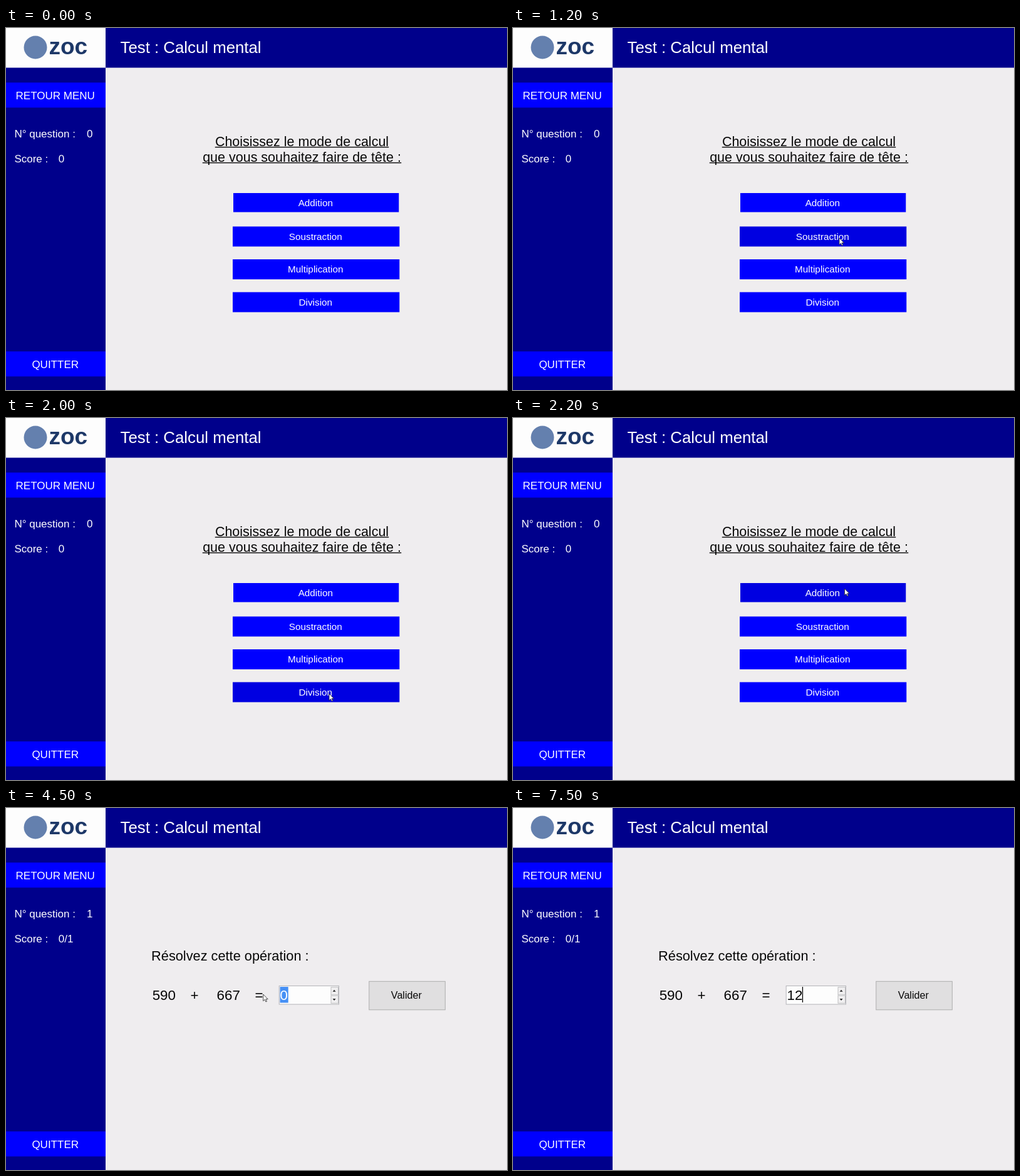
An HTML page that plays this animation: 800x579 px, repeating every 8000 ms.

```html
<!DOCTYPE html>
<html lang="fr">
<head>
<meta charset="utf-8">
<title>Calcul mental</title>
<style>
html, body { margin: 0; width: 100%; height: 100%; overflow: hidden; background: #efedef; }
svg { display: block; width: 100vw; height: 100vh; font-family: "Liberation Sans", Arial, sans-serif; }
text { white-space: pre; }
</style>
</head>
<body>
<svg id="stage" viewBox="0 0 800 579"></svg>
<script>
const NS = "http://www.w3.org/2000/svg";
const stage = document.getElementById("stage");
const NAVY = "#00008b", BLUE = "#0000ff", HOVER = "#0000e1", BLACK = "#080808", GREY = "#efedef";
const LOOP = 8000, STEP = 100;
const SIDE = 159, HEAD = 63.5;
const FIELD = 437.5, DIGIT = 12.4;

function add(parent, tag, attrs, content) {
  const node = document.createElementNS(NS, tag);
  for (const k in attrs) node.setAttribute(k, attrs[k]);
  if (content !== undefined) node.textContent = content;
  parent.appendChild(node);
  return node;
}
const group = () => add(stage, "g", {});
const rect = (p, x, y, width, height, fill, extra) =>
  add(p, "rect", { x, y, width, height, fill, ...extra });
const label = (p, str, x, y, size, fill, extra) =>
  add(p, "text", { x, y, "font-size": size, fill, ...extra }, str);
const mid = { "text-anchor": "middle" };
const show = (node, on) => node.setAttribute("visibility", on ? "visible" : "hidden");

// Header and sidebar
const frame = group();
rect(frame, 0, 0, 800, 579, GREY);
rect(frame, 0, 0, 800, HEAD, NAVY);
rect(frame, 0, 0, SIDE, 579, NAVY);
rect(frame, 0, 0, SIDE, HEAD, "#fdfdfd");
add(frame, "circle", { cx: 47, cy: 31, r: 18.5, fill: "#6480ae" });
label(frame, "zoc", 68.5, 41.5, 37, "#1d3868", { "font-weight": "bold" });
label(frame, "Test : Calcul mental", 182.5, 40.3, 25.8, "#fff");

function sideButton(name, y) {
  rect(frame, 0, y, SIDE, 40, BLUE);
  label(frame, name, 78.7, y + 26.7, 17, "#fff", mid);
}
sideButton("RETOUR MENU", 87.3);
sideButton("QUITTER", 517.3);

function stat(name, x, y) {
  label(frame, name, 13.4, y, 17, "#fff");
  return label(frame, "0", x, y, 17, "#fff");
}
const count = stat("N° question :", 129, 175);
const score = stat("Score :", 83.8, 215);

// Mode menu
const menu = group();
function heading(str, y, width) {
  label(menu, str, 472.5, y, 21.5, BLACK, mid);
  rect(menu, 472.5 - width / 2, y + 1.4, width, 1.4, BLACK);
}
heading("Choisissez le mode de calcul", 188.5, 277.5);
heading("que vous souhaitez faire de tête :", 213.5, 317.5);

const modes = ["Addition", "Soustraction", "Multiplication", "Division"].map((name, i) => {
  const inset = i ? 0 : 1;
  const top = 265 + 52.5 * i - inset, height = 32 - 1.5 * inset;
  const box = rect(menu, 362 + inset, top, 266.3 - 2 * inset, height, BLUE);
  label(menu, name, 494.3, top + 21.4, 15.3, "#fff", mid);
  return { box, top, bottom: top + height };
});

// Question
const quiz = group();
label(quiz, "Résolvez cette opération :", 232.1, 244.2, 21.75, BLACK);
const term = (str, x) => label(quiz, str, x, 307, 22.3, BLACK);
term("590", 233.7);
term("+", 294.6);
term("667", 336.6);
term("=", 397.6);
rect(quiz, 436.2, 284.5, 95.3, 29.5, "#fdfdfd", { stroke: "#b4b4b8" });
for (const dir of [-1, 1]) {
  const cy = 299.4 + 6.7 * dir;
  rect(quiz, 519, cy - 6.1, 11.5, 12.2, "#f0eff0", { stroke: "#b8b8bb", "stroke-width": 0.9 });
  add(quiz, "path", { d: `M521.6 ${cy - dir}h5l-2.5 ${3 * dir}z`, fill: "#222" });
}
const selection = rect(quiz, FIELD, 286, DIGIT + 0.8, 25.5, "#4690f5");
const answer = term("0", FIELD);
const caret = rect(quiz, FIELD, 286, 1.3, 25, "#000");
rect(quiz, 579.8, 277.3, 121.5, 45.5, "#e0dfe0", { stroke: "#adadad" });
label(quiz, "Valider", 639.3, 305.3, 16.1, BLACK, mid);

// Pointers
const arrow = add(stage, "path", {
  d: "M0 0V10.6L2.5 8.3L4.2 12L5.8 11.3L4.2 7.7H7.5Z",
  fill: "#fff", stroke: "#222", "stroke-width": 0.8, "stroke-linejoin": "round"
});
const beam = add(stage, "path", {
  d: "M-3-8.2H-.8L0-7.5L.8-8.2H3M0-7.5V7.5M-3 8.2H-.8L0 7.5L.8 8.2H3",
  fill: "none", stroke: "#111"
});

// Hand movements, each slowing down towards its goal
const ENTER = 100, OPEN = 2500, PRESS = 3400, RELEASE = 3900;
const moves = [
  { from: ENTER, to: 500, x: 530, y: 272 },
  { from: 700, to: 1000, x: 521, y: 336 },
  { from: 1200, to: 2000, x: 516, y: 441 },
  { from: 2000, to: 2200, x: 529.5, y: 273 },
  { from: 2900, to: PRESS, x: 459, y: 301 },
  { from: PRESS, to: 3800, x: 414, y: 301 },
  { from: 3800, to: RELEASE, x: 410.7, y: 298 }
];
const easeOut = k => 1 - (1 - k) ** 2;

function pointer(t) {
  let x = 697, y = 62;
  for (const m of moves) {
    const k = easeOut(Math.min(1, Math.max(0, (t - m.from) / (m.to - m.from))));
    x += (m.x - x) * k;
    y += (m.y - y) * k;
  }
  return [x, y];
}

function modeAt(t) {
  const [x, y] = pointer(t);
  return t < ENTER ? -1 : modes.findIndex(m => x < 628 && y >= m.top && y <= m.bottom);
}

// The press and the two keys restart the caret's blinking
const inputs = [PRESS, 4600, 6450];
const BLINK = 1050, LIT = 500;

function draw(ms) {
  const t = Math.floor((ms % LOOP) / STEP) * STEP;
  const [x, y] = pointer(t);
  const asking = t >= OPEN;
  show(menu, !asking);
  show(quiz, asking);
  count.textContent = asking ? "1" : "0";
  score.textContent = asking ? "0/1" : "0";

  // The highlight trails the pointer by one step
  const now = modeAt(t), over = now >= 0 ? now : modeAt(t - STEP);
  modes.forEach((m, i) => m.box.setAttribute("fill", i === over ? HOVER : BLUE));

  const done = inputs.filter(at => at <= t);
  const typed = Math.max(0, done.length - 1);
  const selected = done.length === 1 && x < FIELD + DIGIT / 2;
  show(selection, selected);
  answer.setAttribute("fill", selected ? "#fff" : BLACK);
  answer.textContent = "12".slice(0, typed) || "0";
  caret.setAttribute("x", FIELD + DIGIT * Math.max(1, typed) - 0.5);
  show(caret, done.length > 0 && !selected && (t - done[done.length - 1]) % BLINK < LIT);

  const visible = t >= ENTER && typed === 0;
  const inField = asking && x < 518 && t < RELEASE;
  for (const node of [arrow, beam]) {
    node.setAttribute("transform", `translate(${x} ${y})`);
    show(node, visible && inField === (node === beam));
  }
}

const start = performance.now();
function tick() {
  draw(performance.now() - start);
  requestAnimationFrame(tick);
}
tick();
</script>
</body>
</html>
```
